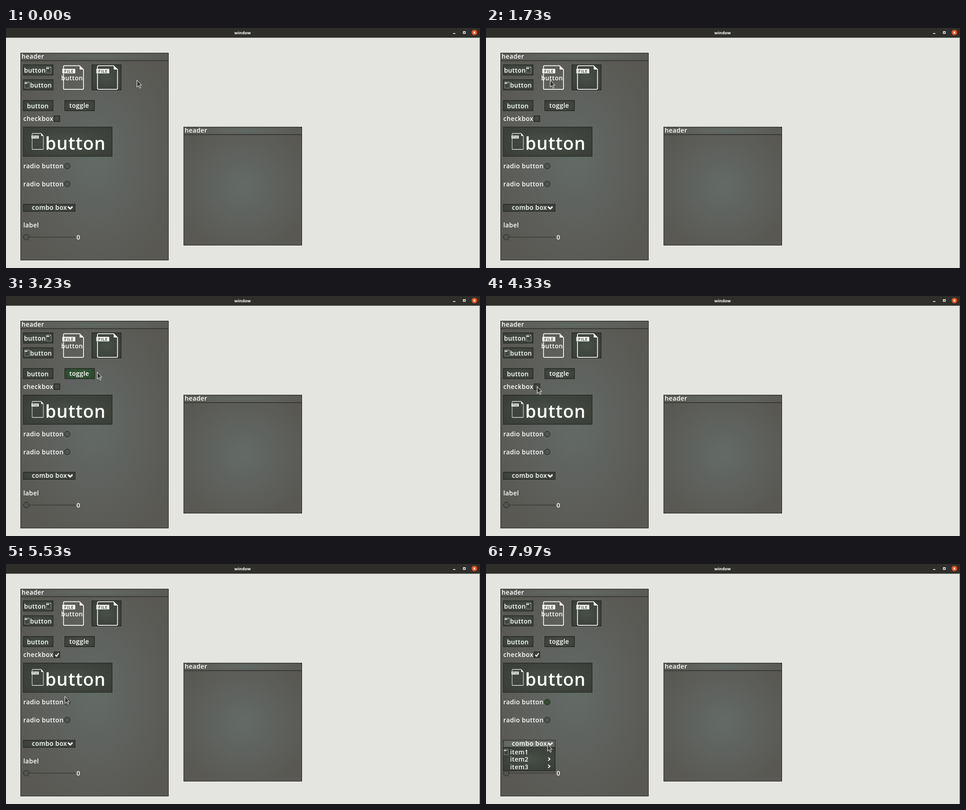
These frames come from a looping animation (1052x532 px, 8 s). An HTML page:

```html
<!DOCTYPE html>
<html lang="en">
<head>
<meta charset="utf-8">
<title>window</title>
<style>
html, body { margin: 0; width: 100%; height: 100%; overflow: hidden; background: #e4e5e0; }
svg { display: block; }
text { font: 600 14px "Open Sans", "Noto Sans", sans-serif; letter-spacing: .027em; fill: #fff; }
.edge { stroke: #1b1c1a; }
.line { fill: none; stroke: #fff; }
</style>
</head>
<body>
<svg id="stage" width="1052" height="532" viewBox="0 0 1052 532">
  <defs>
    <radialGradient id="panel" r=".6"><stop stop-color="#636b66"/><stop offset=".55" stop-color="#5e605c"/><stop offset="1" stop-color="#595853"/></radialGradient>
    <radialGradient id="idle" r=".65"><stop stop-color="#475047"/><stop offset="1" stop-color="#3a3d38"/></radialGradient>
    <radialGradient id="hover" r=".65"><stop stop-color="#737b75"/><stop offset="1" stop-color="#5f625d"/></radialGradient>
    <radialGradient id="on" r=".65"><stop stop-color="#385b39"/><stop offset="1" stop-color="#2b472c"/></radialGradient>
    <g id="file">
      <path class="line" stroke-width="1.7" d="M3.6 9V3.6a2 2 0 0 1 2-2H39L48 10V51.8a2 2 0 0 1-2 2H5.6a2 2 0 0 1-2-2V19"/>
      <path fill="#fff" d="M39.5 1V10H48.5Z"/>
      <path fill="#f4f5f2" d="M1 8.5H29.7V18.5H1Z"/>
      <text x="15.7" y="17" text-anchor="middle" style="font-size:9px;font-weight:700;fill:#525753;letter-spacing:.7px">FILE</text>
    </g>
  </defs>
  <path fill="#2f2e2a" d="M0 0H1052V21.5H0Z"/>
  <path stroke="#62625d" d="M1051.5 22V532"/>
  <text x="525" y="13.5" text-anchor="middle" style="font-size:9.3px;font-weight:700;letter-spacing:0">window</text>
  <path class="line" stroke-width="1.5" d="M992 12.2H997.5M1015 8H1019.4V12H1015Z"/>
  <circle cx="1039.5" cy="10" r="6.2" fill="#e2521f"/>
  <path class="line" stroke-width="1.3" d="M1037.3 7.8l4.4 4.4m0-4.4l-4.4 4.4"/>
  <g id="ui"></g>
  <g id="menu"></g>
  <path id="cursor" fill="#343633" stroke="#fff" d="M.5 .5V16L4 12.7 6.5 18.4 8.9 17.3 6.4 11.8H11Z"/>
</svg>
<script>
const $ = id => document.getElementById(id);
const box = (x, y, w, h, fill, id = "") =>
  `<rect id="${id}" class="edge" x="${x + .5}" y="${y + .5}" width="${w}" height="${h}" fill="url(#${fill})"/>`;
const label = (x, y, s, size = 14) => `<text x="${x}" y="${y}" style="font-size:${size}px">${s}</text>`;
const file = (x, y, sx = 1, sy = sx) => `<use href="#file" transform="translate(${x} ${y}) scale(${sx} ${sy})"/>`;
const dot = (y, x = 136, id = "") => `<circle id="${id}" class="edge" cx="${x}" cy="${y}" r="6.3" fill="#50554f"/>`;
const stroke = (d, w) => `<path class="line" stroke-width="${w}" d="${d}"/>`;
const panel = (x, y, w, h) => box(x, y, w, h, "panel") + box(x, y, w, 17, "panel") + label(x + 2.5, y + 13, "header");

// Controls that react to the pointer
const control = (x, y, w = 66, h = 23) => ({ x, y, w, h });
const controls = {
  right: control(38, 81), left: control(38, 114), icon: control(190, 81, 65, 56),
  plain: control(38, 160), toggle: control(130, 160), check: control(106, 194, 13, 13),
  big: control(38, 219, 197, 65), combo: control(38, 390, 115, 16)
};
const radios = [306, 345.5];

$("ui").innerHTML =
  panel(32, 55, 328, 459) + panel(394, 219, 262, 262) +
  Object.entries(controls).map(([id, { x, y, w, h }]) => box(x, y, w, h, "idle", id)).join("") +
  label(40, 99, "button") + file(89, 85.5, .23, .27) +
  file(41, 118.5, .23, .27) + label(53.5, 132, "button") +
  file(124, 82) + label(122.5, 115.5, "button") + file(199.5, 82) +
  label(46.5, 178, "button") + label(140.5, 176.5, "toggle") + label(38.5, 206, "checkbox") +
  `<g id="tick">${stroke("M109.5 201.5l2.6 3 5-7", 2)}</g>` +
  file(56, 232.5, .56, .68) + label(87, 270, "button", 39) +
  radios.map((y, i) => label(38.5, y + 5, "radio button") + dot(y, 136, "radio" + i)).join("") +
  label(57.5, 403, "combo box") + stroke("M137.5 396l5 4.8 5-4.8", 3.2) +
  label(38.5, 442, "label") +
  `<path stroke="#484946" stroke-width="3" d="M45 463.5H154"/>` + dot(463.5, 45) + label(156.5, 468.5, "0");

$("menu").innerHTML = box(38, 406, 115, 52, "idle") + file(39.5, 410, .2, .24) +
  [1, 2, 3].map(n => label(53.5, 405.5 + n * 16.4, "item" + n)).join("") +
  stroke("M138 429l4 3.5-4 3.5M138 445l4 3.5-4 3.5", 2);

// Pointer moves: start time, duration, destination
const moves = [
  [130, 700, 70, 96], [1030, 100, 69, 113], [1130, 200, 69, 119],
  [1530, 400, 214, 110], [1930, 400, 178, 133], [2330, 400, 163, 168],
  [2830, 200, 214, 168], [3130, 300, 167, 168], [3630, 200, 228, 158],
  [3930, 400, 113, 200], [4630, 400, 140, 252], [5030, 500, 130, 293],
  [5630, 300, 136, 302], [6030, 400, 136, 347], [6730, 400, 136, 307],
  [7230, 300, 136, 393], [7630, 300, 136, 399]
];
const clamp = v => Math.min(1, Math.max(0, v));
const ease = k => k * k * (3 - 2 * k);

function pointer(t) {
  let px = 290, py = 115;
  for (const [start, span, x, y] of moves) {
    const k = ease(clamp((t - start) / span));
    px += (x - px) * k;
    py += (y - py) * k;
  }
  return [Math.round(px), Math.round(py)];
}

const show = (id, on) => $(id).style.display = on ? "" : "none";

function draw(t) {
  // The pointer is refreshed every 100 ms
  const [px, py] = pointer(Math.floor((t - 30) / 100) * 100 + 30);
  const toggled = t >= 2830 && t < 3630;
  for (const [id, { x, y, w, h }] of Object.entries(controls)) {
    const over = id !== "check" && px >= x && px <= x + w && py >= y && py <= y + h;
    const state = id === "toggle" && toggled ? "on" : over ? "hover" : "idle";
    $(id).setAttribute("fill", `url(#${state})`);
  }
  const chosen = t < 6070 ? -1 : t >= 6670 && t < 7300 ? 1 : 0;
  radios.forEach((y, i) => {
    const over = Math.hypot(px - 136, py - y) < 6.5;
    $("radio" + i).setAttribute("fill", i === chosen ? "#30502f" : over ? "#5c605b" : "#50554f");
  });
  show("tick", t >= 4630);
  show("menu", t >= 7670);
  $("cursor").setAttribute("transform", `translate(${px} ${py})`);
}

const start = performance.now();
function loop() {
  draw((performance.now() - start) % 8000);
  requestAnimationFrame(loop);
}
loop();
</script>
</body>
</html>
```
